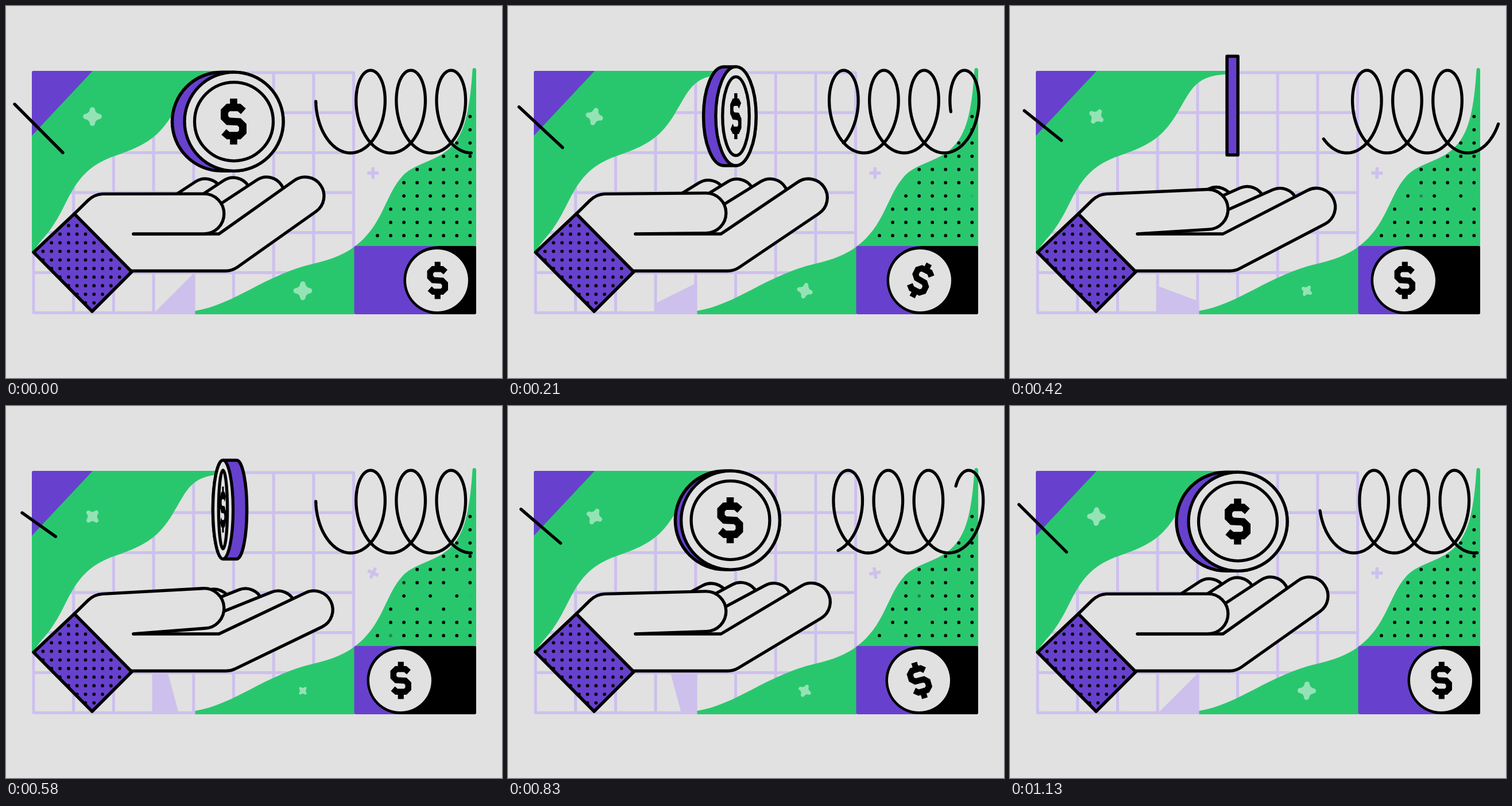
These frames come from a looping animation (864x648 px, 1180 ms). An HTML page with a canvas:

```html
<!DOCTYPE html>
<html lang="en">
<head>
<meta charset="utf-8">
<title>Coin toss</title>
<style>
  html, body { margin: 0; width: 100%; height: 100%; overflow: hidden; background: #e1e1e1; }
  canvas { display: block; width: 864px; height: 648px; }
</style>
</head>
<body>
<canvas id="stage"></canvas>
<script>
const BG = '#e1e1e1', INK = '#000', GREEN = '#29c76d', PURPLE = '#6741cd',
      LILAC = '#cdc0ed', MINT = '#94e3b5';
const LOOP = 1180, STEPS = 28, HALF = STEPS / 2;
const PI = Math.PI, TAU = PI * 2, RAD = PI / 180;
const { sin, cos, tan, min, max, abs } = Math;

const canvas = document.getElementById('stage');
const c = canvas.getContext('2d');
const dpr = window.devicePixelRatio || 1;
canvas.width = 864 * dpr;
canvas.height = 648 * dpr;

// Easing; all times are in steps of 1/24 s.
const clamp = v => max(0, min(1, v));
const sine = v => (1 - cos(PI * clamp(v))) / 2;
const cubic = v => (v = clamp(v)) < 0.5 ? 4 * v ** 3 : 1 - 4 * (1 - v) ** 3;

// Gentle there-and-back over the loop.
function swing(t) {
  const p = 1 - abs(t / HALF - 1);
  return (p + sine(p)) / 2;
}

function fill(color) { c.fillStyle = color; c.fill(); }

function stroke(width = 5.3, color = INK) {
  c.lineWidth = width;
  c.strokeStyle = color;
  c.stroke();
}

function box(color, x, y, w, h) {
  c.fillStyle = color;
  c.fillRect(x, y, w, h);
}

function poly(points, close = true) {
  c.beginPath();
  points.forEach(([x, y]) => c.lineTo(x, y));
  if (close) c.closePath();
}

function disc(x, y, r, color) {
  c.beginPath();
  c.arc(x, y, r, 0, TAU);
  fill(color);
}

function at(x, y, deg, paint) {
  c.save();
  c.translate(x, y);
  c.rotate(deg * RAD);
  paint();
  c.restore();
}

function clipTo(x, y, w, h, r, paint) {
  c.save();
  c.beginPath();
  c.roundRect(x, y, w, h, r);
  c.clip();
  paint();
  c.restore();
}

const leftHill = new Path2D('M45 113H390V118.5C322 118.5 318 143 291 187C266 228 245 242 190 261' +
  'C148 276 129 295 108 335C95 361 84 384 62 408L45 430Z');
const rightHill = new Path2D('M812.6 111C812.6 107 819 107 819 111V420H607V537H329.5V531' +
  'C398 520 450 469 535 449C566 442 588 433 606 420C656 384 660 330 690 297' +
  'C707 278 731 275 760 258C795 235 807 198 812.6 111Z');

// Grid of dots kept where it falls on the right hill.
const hillDots = [];
for (let row = 0; row < 10; row++)
  for (let col = 0; col < 8; col++) {
    const x = 647 + col * 23.05, y = 192.5 + row * 23.05;
    if (c.isPointInPath(rightHill, x - 2.5, y - 1)) hillDots.push({ x, y, id: `${col},${row}` });
  }
// Dots that blink, one after the other.
const blinking = '2,5 7,6 6,7 5,6 2,7 3,6 4,7 6,5 1,9 3,8'.split(' ');

function dots(t) {
  for (const { x, y, id } of hillDots) {
    const i = blinking.indexOf(id), off = 1.8 + 1.35 * i;
    c.globalAlpha = i < 0 ? 1 : clamp(max(off + 2 - t, t - off - 10.8) / 2);
    disc(x, y, 2.9, INK);
  }
  c.globalAlpha = 1;
}

function grid() {
  const cell = 69.7;
  c.beginPath();
  for (let i = 0; i <= 8; i++) {
    c.moveTo(48 + i * cell, 116);
    c.lineTo(48 + i * cell, 116 + 6 * cell);
  }
  for (let j = 0; j <= 6; j++) {
    c.moveTo(48, 116 + j * cell);
    c.lineTo(48 + 8 * cell, 116 + j * cell);
  }
  stroke(5, LILAC);
}

function wedge(t) {
  const turn = 45 + 120 * min(1, t / HALF) ** 1.8 + 240 * sine((t - HALF) / 9);
  clipTo(255, 464, 74.5, 72.5, 0, () =>
    at(292, 500, turn, () => box(LILAC, 0.5, -80, 100, 160)));
}

function panels() {
  clipTo(45, 113, 400, 424, 3, () => {
    c.fillStyle = GREEN;
    c.fill(leftHill);
    poly([[45, 113], [151, 113], [45, 226]]);
    fill(PURPLE);
  });
  c.fillStyle = GREEN;
  c.fill(rightHill);
}

function star(x, y, size, deg) {
  at(x, y, deg, () => {
    c.scale(size, size);
    c.beginPath();
    c.moveTo(11.8, 0);
    for (let i = 1; i <= 4; i++) {
      const tip = i * PI / 2, dip = tip - PI / 4;
      c.quadraticCurveTo(2.1 * cos(dip), 2.1 * sin(dip), 11.8 * cos(tip), 11.8 * sin(tip));
    }
    fill(MINT);
    stroke(9, MINT);
  });
}

function plus(t) {
  at(639.3, 291, 90 * sine((t - 9) / 14), () => {
    box(LILAC, -10, -2.8, 20, 5.6);
    box(LILAC, -2.8, -10, 5.6, 20);
  });
}

// Dollar sign centred on the origin, 80 high; the lower half is the upper one turned round.
function dollar() {
  const half = [[17, -18], [9.5, -24.5], [-9.5, -24.5], [-16, -18], [-16, -7], [-9.5, -0.5]];
  c.save();
  c.lineCap = 'butt';
  c.lineJoin = 'miter';
  poly([...half, ...half.map(([x, y]) => [-x, -y]).reverse()], false);
  stroke(13);
  box(INK, -6.3, -40, 12.6, 14);
  box(INK, -6.3, 26, 12.6, 14);
  c.restore();
}

function slider(t) {
  const back = cubic((t - 14.7) / 10.95);
  const x = 751 - 64 * (cubic(t / 9.9) - back);
  const turn = -360 * (cubic((t - 0.5) / 9.5) - back);
  clipTo(606.5, 418, 212.5, 119, 3, () => {
    box(PURPLE, 600, 410, 230, 140);
    disc(x + 0.8, 477.7, 59.3, INK);
    box(INK, x + 0.8, 410, 200, 140);
    disc(x, 478, 54, BG);
    at(x + 0.8, 478, turn, () => {
      c.scale(0.81, 0.81);
      dollar();
    });
  });
}

// Upper edge and round tip of a finger that points up at angle a.
function fingertip(x, y, r, a, [rootX, rootY]) {
  c.lineTo(rootX, rootY);
  c.lineTo(x - sin(a) * r, y - cos(a) * r);
  c.arc(x, y, r, -PI / 2 - a, PI / 2 - a);
}

function farFinger(x, y, a) {
  const r = 31, len = 140;
  c.beginPath();
  fingertip(x, y, r, a, [x - sin(a) * r - cos(a) * len, y - cos(a) * r + sin(a) * len]);
  c.lineTo(x + sin(a) * r - cos(a) * len, y + cos(a) * r + sin(a) * len);
  fill(BG);
  stroke();
}

function palm(tilt) {
  // The front finger turns about the knuckle.
  const g = tilt * RAD, a = (35.3 - tilt) * RAD, r = 33;
  const x = 384 + 137 * cos(g) + 103.5 * sin(g);
  const y = 434.5 + 137 * sin(g) - 103.5 * cos(g);
  const bend = x + sin(a) * r - (461.5 - y - cos(a) * r) / tan(a);
  poly([[119, 362], [270, 335], [270, 440], [219, 461.5]]);
  fill(BG);
  c.beginPath();
  c.moveTo(222, 397);
  fingertip(x, y, r, a, [371, 397]);
  c.arcTo(bend, 461.5, 219, 461.5, 36);
  c.lineTo(219, 461.5);
  fill(BG);
  stroke();
}

function thumb(tilt) {
  const lean = tilt * 0.28 * RAD;
  c.beginPath();
  c.moveTo(119, 362);
  c.lineTo(143, 338.5);
  c.quadraticCurveTo(154, 328, 168, 327.3);
  c.arc(345, 362 - tilt, 34.8, -PI / 2 - lean, PI / 2 - lean);
  c.lineTo(222, 397);
  fill(BG);
  stroke();
}

function cuff() {
  poly([[119, 362], [219, 463], [150, 532], [48, 429]]);
  fill(PURPLE);
  stroke(5.6);
  for (let i = 0; i < 10; i++)
    for (let j = 0; j < 10; j++) {
      const x = 64.5 + i * 14.8, y = 382.5 + j * 14.95;
      if (abs(x + y - 581) < 98 && abs(y - x - 313) < 66) disc(x, y, 2.9, INK);
    }
}

function hand(t) {
  const k = sine((t - 2.5) / 10.5) - sine((t - 14.4) / 10.5), tilt = 9.5 * k;
  const a = (33.3 - tilt * 1.2) * RAD;
  clipTo(290, 280, 330, 140, 0, () => {
    farFinger(347 + 15 * k, 332 + 18 * k, a);
    farFinger(396 + 21 * k, 330 + 19 * k, a);
    farFinger(454 + 20 * k, 329 + 24 * k, a);
  });
  palm(tilt);
  thumb(tilt);
  cuff();
}

function stick(s) {
  poly([[15 + 13 * s, 171 + 15 * s], [99 - 12.5 * s, 255.5 - 28 * s]], false);
  stroke(5.4);
}

// A drifting coil whose ends slip back one turn in each half of the loop.
function spring(t) {
  const p = t % HALF / HALF, parts = 240;
  const left = 565 + 70 * sine(p);
  const from = 0.21 - Math.sqrt(p), to = 3.5 - sine((p - 0.036) / 0.964);
  c.beginPath();
  for (let i = 0; i <= parts; i++) {
    const u = from + (to - from) * i / parts;
    c.lineTo(left + 70.1 * u - 41.3 * sin(TAU * u), 184 - 72 * cos(TAU * u));
  }
  stroke();
}

function coin(t) {
  const y = 201.3 - 28.3 * (sine((t - 1.25) / 9.6) - sine((t - 9.7) / 12.6));
  const turn = t <= 10 ? 90 * (1 - (1 - t / 10) ** 1.9) : 90 + 90 * cubic((t - 10) / 12.5);
  const rx = max(0.01, 86 * abs(cos(turn * RAD)));
  // Past the edge-on moment the other face is seen, on the other side.
  const face = t <= 10 ? 397 : 378 + 19 * sine((t - 16) / 8);
  const back = t <= 10 ? 375.5 + 2.5 * (t / 10) ** 4
                       : 397 + 5 * sine((t - 10) / 4) - 26 * sine((t - 14) / 7);
  c.beginPath();
  c.ellipse(min(face, back), y, rx, 86, 0, PI / 2, PI * 1.5);
  c.ellipse(max(face, back), y, rx, 86, 0, -PI / 2, PI / 2);
  c.closePath();
  fill(PURPLE);
  stroke(5.5);
  if (rx < 1) return;
  c.beginPath();
  c.ellipse(face, y, rx, 86, 0, 0, TAU);
  fill(BG);
  stroke();
  const inner = (rx - 9) / 77;
  if (inner < 0.02) return;
  c.beginPath();
  c.ellipse(face, y, 68.5 * inner, 68.5, 0, 0, TAU);
  stroke();
  at(face - 0.5 * inner, y, 0, () => {
    c.scale((rx + 4) / 90, 1);
    dollar();
  });
}

function draw(t) {
  const s = swing(t);
  c.setTransform(dpr, 0, 0, dpr, 0, 0);
  c.lineCap = c.lineJoin = 'round';
  box(BG, 0, 0, 864, 648);
  grid();
  wedge(t);
  panels();
  plus(t);
  star(150.5, 192.5, 1 - 0.18 * s, 45 * s);
  star(517, 496, 1 - 0.49 * s, 45 * s);
  dots(t);
  slider(t);
  hand(t);
  stick(s);
  spring(t);
  coin(t);
}

// 24 steps a second, each start rounded to 10 ms.
function stepAt(ms) {
  let i = STEPS - 1;
  while (i > 0 && Math.round(i * 12.5 / 3) * 10 > ms) i--;
  return i;
}

const start = performance.now();
let shown = -1;
function tick() {
  const step = stepAt((performance.now() - start) % LOOP);
  if (step !== shown) draw(shown = step);
  requestAnimationFrame(tick);
}
tick();
</script>
</body>
</html>
```
